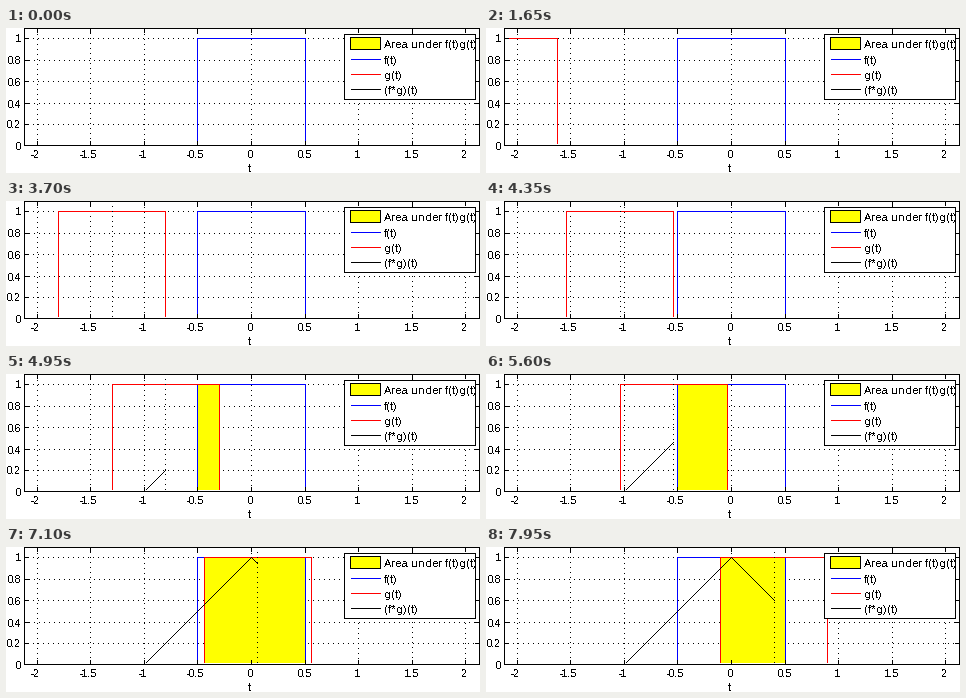
Write a matplotlib script that moves like this. It is 474 px wide and 145 px high and loops after 8000 ms.

```python
import numpy as np
import matplotlib.pyplot as plt
from matplotlib.animation import FuncAnimation
from matplotlib.patches import Rectangle

W, H, DPI = 474, 145, 100
PX = 72 / DPI
LEFT, RIGHT, TOP, BASE = 18, 473, 0, 117
LOW = BASE - 2  # last pixel row of the plotted shapes
GAP = 5         # spacing of the dotted lines
FRAMES, STEP_MS = 160, 50
RED, BLUE, YELLOW = (1, 0, 0), (0, 0, 1), (1, 1, 0)

plt.rcParams.update({
    "font.family": "Liberation Sans",
    "axes.unicode_minus": False,
    "text.antialiased": False,
    "text.hinting_factor": 1,
})
fig = plt.figure(figsize=(W / DPI, H / DPI), dpi=DPI, facecolor="white")
ax = fig.add_axes([0, 0, 1, 1])
ax.set(xlim=(0, W), ylim=(H, 0))
ax.axis("off")


def px(t):
    return 245 + 107.1 * t


def col(t):
    return int(np.floor(px(t) + 0.5))


def row(v):
    return int(np.floor(BASE + 0.95 - 107 * v))


def bounds(patch, x0, y0, x1, y1):
    """Cover whole pixels, both ends included."""
    patch.set_bounds(x0, y0, x1 - x0 + 1, y1 - y0 + 1)
    patch.set_visible(x1 >= x0 and y1 >= y0)


def box(x0=0, y0=0, x1=-1, y1=-1, color="black", z=1):
    patch = Rectangle((0, 0), 1, 1, fc=color, lw=0, antialiased=False, zorder=z)
    bounds(patch, x0, y0, x1, y1)
    return ax.add_patch(patch)


def set_dots(line, xs, ys):
    xs, ys = np.broadcast_arrays(xs, ys)
    line.set_data(xs + 0.5, ys + 0.5)


def dots(xs, ys, z):
    line, = ax.plot([], [], "k,", zorder=z)
    set_dots(line, xs, ys)
    return line


def label(x, y, s, size=10.5, ha="center"):
    ax.text(x, y, s, fontsize=size * PX, ha=ha, va="center_baseline", zorder=12)


# grid lines run to and fro, so their dots start at alternate ends
for i, t in enumerate(np.arange(-2, 2.1, 0.5)):
    x = col(t)
    down = np.arange(TOP, BASE, GAP)
    up = np.arange(BASE - 1, TOP, -GAP)
    dots(x, down if i % 2 else up, 1)
    box(x, TOP, x, TOP + 4, z=6)
    box(x, BASE - 4, x, BASE, z=6)
    label(x - 0.5 - (t < 0), 126, f"{t:g}")
for i, v in enumerate(np.arange(0, 1.1, 0.2)):
    y = row(v)
    if i:
        right = np.arange(LEFT, RIGHT, GAP)
        left = np.arange(RIGHT - 1, LEFT, -GAP)
        dots(left if i % 2 else right, y, 1)
    box(LEFT, y, LEFT + 4, y, z=6)
    box(RIGHT - 4, y, RIGHT, y, z=6)
    label(15, y + 0.5, f"{v:.1g}", ha="right")
label(243.5, 140, "t")
box(LEFT, TOP, RIGHT, TOP, z=6)
box(LEFT, BASE, RIGHT, BASE, z=6)
box(LEFT, TOP, LEFT, BASE, z=6)
box(RIGHT, TOP, RIGHT, BASE, z=6)

# fixed pulse f
FL, FR, ONE = col(-0.5), col(0.5), row(1)
box(FL, ONE, FR, ONE, BLUE, 4)
for x in (FL, FR):
    box(x, ONE, x, LOW, BLUE, 4)

# legend
box(338, 6, 469, 71, z=10)
box(339, 7, 468, 70, "white", 10)
box(344, 9, 374, 21, z=11)
box(345, 10, 373, 20, YELLOW, 11)
for y, c in ((31, BLUE), (46, RED), (61, "black")):
    box(345, y, 374, y, c, 11)
for i, s in enumerate(("Area under f(t)g(t)", "f(t)", "g(t)", "(f*g)(t)")):
    label(378, 16.5 + 15.2 * i, s, 11, "left")

# moving parts
area = box(color=YELLOW, z=3)
g_top, g_left, g_right_up, g_right_low = (box(color=RED, z=5) for _ in range(4))
marker = dots([], [], 7)
curve = dots([], [], 8)
MID = (ONE + BASE) // 2


def upright(patch, x, y0, y1):
    bounds(patch, x, y0, x, y1)
    patch.set_visible(x > LEFT)


def draw(n):
    t = -2.78 + 0.02 * n
    x0, x1 = col(t - 0.5), col(t + 0.5)
    bounds(g_top, max(x0, LEFT + 1), ONE, x1, ONE)
    upright(g_left, x0, ONE, LOW)
    # the falling edge leans very slightly
    upright(g_right_up, col(t + 0.499), ONE, MID)
    upright(g_right_low, x1, MID + 1, LOW)

    a0, a1 = max(x0, FL), min(x1, FR)
    bounds(area, a0 + 1, ONE + 1, a1 - 1, LOW)

    x = col(t)
    set_dots(marker, x, np.arange(TOP, LOW + 1, GAP))
    marker.set_visible(x > LEFT)

    xs = np.arange(col(-1), x + 1)
    ys = np.floor(BASE + 0.5 - 107 * (1 - np.abs(xs - px(0)) / 107.1))
    keep = ys <= LOW
    set_dots(curve, xs[keep], ys[keep])
    return ()


anim = FuncAnimation(fig, draw, frames=FRAMES, interval=STEP_MS,
                     init_func=lambda: draw(0), repeat=True, repeat_delay=0)
plt.show()
```
